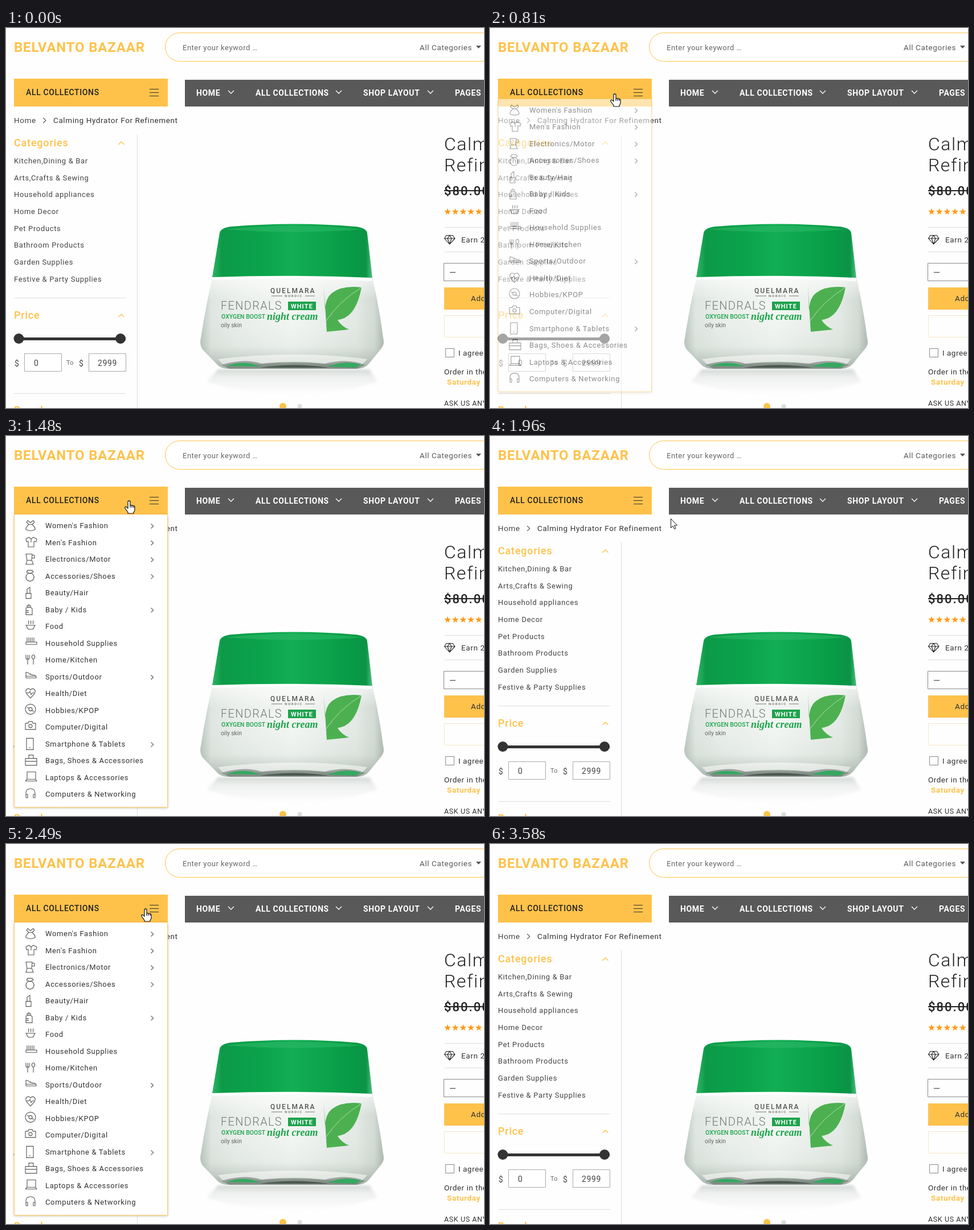
These frames come from a looping animation (839x668 px, 3780 ms). An HTML page:

```html
<!DOCTYPE html>
<html lang="en">
<head>
<meta charset="utf-8">
<title>Shop menu</title>
<style>
  html, body { margin: 0; width: 100%; height: 100%; overflow: hidden; background: #fefefe; }
  svg { display: block; width: 839px; height: 668px; }
  text { font-family: Roboto, "Noto Sans", sans-serif; font-size: 13px; letter-spacing: .65px; fill: #444; white-space: pre; }
  .line { fill: none; stroke: #ddd; }
  .icon { fill: none; stroke: #555; stroke-width: 1.1; stroke-linejoin: round; }
  .panel { filter: drop-shadow(0 1px 2px rgba(150, 110, 30, .4)); }
  .btn { filter: drop-shadow(0 1px 1.5px rgba(0, 0, 0, .3)); }
</style>
</head>
<body>
<svg id="stage" viewBox="0 0 839 668">
  <defs>
    <linearGradient id="lid">
      <stop offset="0" stop-color="#2fb765"/><stop offset=".06" stop-color="#0c9a48"/>
      <stop offset=".3" stop-color="#0aa34b"/><stop offset=".5" stop-color="#12ae54"/>
      <stop offset=".85" stop-color="#079c46"/><stop offset=".96" stop-color="#0b9346"/>
      <stop offset="1" stop-color="#4dc07c"/>
    </linearGradient>
    <linearGradient id="glass">
      <stop offset="0" stop-color="#b9c4bd"/><stop offset=".06" stop-color="#dfe6e1"/>
      <stop offset=".2" stop-color="#e9eeea"/><stop offset=".5" stop-color="#f3f6f3"/>
      <stop offset=".85" stop-color="#e3e9e4"/><stop offset=".95" stop-color="#d2dad4"/>
      <stop offset="1" stop-color="#adb8b0"/>
    </linearGradient>
    <linearGradient id="shade" x2="0" y2="1">
      <stop offset="0" stop-color="#fff" stop-opacity=".6"/><stop offset=".25" stop-color="#fff" stop-opacity="0"/>
      <stop offset=".75" stop-color="#9fb0a4" stop-opacity=".1"/><stop offset="1" stop-color="#76887b" stop-opacity=".55"/>
    </linearGradient>
    <linearGradient id="mirror" x2="0" y2="1">
      <stop offset="0" stop-color="#d3d8d5"/><stop offset=".3" stop-color="#eef0ef"/>
      <stop offset="1" stop-color="#fefefe"/>
    </linearGradient>
    <filter id="soft"><feGaussianBlur stdDeviation="2"/></filter>
  </defs>

  <g id="jar">
    <path d="M372 600H638L652 622Q505 668 352 622Z" fill="url(#mirror)" filter="url(#soft)"/>
    <g id="body">
      <path id="glassShape" d="M363 438Q352 480 342 545Q339 556 345 565L369 590Q376 599 392 599H614Q630 599 637 590L659 563Q665 555 662 545Q655 490 643 438Z" fill="url(#glass)"/>
      <path d="M363 438Q352 480 342 545Q339 556 345 565L369 590Q376 599 392 599H614Q630 599 637 590L659 563Q665 555 662 545Q655 490 643 438Z" fill="url(#shade)"/>
      <path d="M372 582Q505 566 634 582L622 595Q505 584 384 595Z" fill="#fff" opacity=".55"/>
      <path d="M378 592Q420 580 448 590Q505 584 560 590Q600 580 630 592L616 599H392Z" fill="#5d6a61" opacity=".55"/>
      <path d="M386 594Q420 583 446 595ZM564 595Q596 583 624 592L612 597Z" fill="#35a860"/>
      <path d="M446 597Q505 588 566 597Z" fill="#3f4a43" opacity=".8"/>
    </g>
    <path d="M362 438Q505 430 643 440L642 445Q505 437 362 443Z" fill="#fff" opacity=".85"/>
    <path d="M375 360Q377 351 396 349Q505 340 612 349Q632 351 634 360L643 439Q505 433 362 438Z" fill="url(#lid)"/>
    <path d="M384 354Q505 341 626 354Q505 363 384 354Z" fill="#2fbb69" opacity=".55"/>
    <path d="M558 453L563 534L602 530Q588 524 582 513Q614 510 624 456Q590 452 572 466Q560 476 560 498Z" fill="#4cb050"/>
    <path d="M561 516Q585 480 624 456" fill="none" stroke="#b5dcb2"/>
    <path d="M466 471H485M525 471H542" stroke="#777"/>
    <rect x="495" y="481" width="49" height="15" fill="#1da34c"/>
  </g>

  <g id="page">
    <rect x="279.5" y="8.5" width="600" height="50" rx="25" fill="#fff" stroke="#fcc24d"/>
    <path d="M825 31H834L829.5 36Z" fill="#555"/>
    <path d="M314 91H839V138H314Z" fill="#595959"/>
    <path class="line" d="M14 474.5H211M14 642.5H211M230.5 187V668M769 350.5H839M769 393.5H839"/>
    <path d="M22 546.5H210" stroke="#333" stroke-width="5"/>
    <circle cx="22.500" cy="546" r="9" fill="#333"/><circle cx="201" cy="546" r="9" fill="#333"/>
    <path d="M32.500 572.500h65v31h-65zM145.500 572.500h65v31h-65z" fill="#fff" stroke="#aaa"/>
    <path d="M769 286H839" stroke="#222" stroke-width="2"/>
    <path class="icon" style="stroke:#222" d="M773 364.500H784L788 370L778.500 380L769.500 370ZM769.500 370H788M775 370L778.500 380L782 370L778.500 364.500Z"/>
    <path d="M768.500 413.500H850V444.500H768.500ZM771.500 563.500h15v15h-15z" fill="none" stroke="#888"/>
    <path d="M779 429.500H789" stroke="#333"/>
    <path d="M769 456H839V495H769Z" fill="#fec24b"/>
    <path d="M850 505.500H769.500V543.500H850" fill="none" stroke="#f3e6c8"/>
    <circle cx="486" cy="665" r="6" fill="#fec24b"/><circle cx="515.500" cy="665" r="4" fill="#ddd"/>
  </g>

  <g id="slides"></g>
  <path d="M14 89H284V138H14Z" fill="#fec24b"/>
  <g id="bar"><path d="M252 107.500H268M252 113.500H268M252 119.500H268" stroke="#333" stroke-width="1.2"/></g>
  <g id="menu"><path class="panel" d="M14.500 138V652.500H283.500V138" fill="#fff" stroke="#fdcb69"/></g>

  <g id="cursor" stroke="#111" stroke-linejoin="round">
    <path id="hand" fill="#fff" stroke-width="1.2" d="M-2 1Q0-1 2 1V8Q4 7 5 8.500Q7 7.500 8 9Q10 8.500 10 11V15Q10 18 8 20V22H-2V20Q-5 16-7 13Q-8 10-5 10.500L-2 13ZM2 8V12M5 8.500V12M8 9V12"/>
    <path id="arrow" fill="#fff" d="M.5 .5V16.500L4 13L6.500 18.500L9 17.500L6.500 12H11.500Z"/>
    <g id="zoom" fill="#fff"><path d="M3 3L8.500 8.500" stroke-width="3"/><circle cx="-1" cy="-1" r="5.500" stroke-width="1.500"/><path d="M-4-1H2M-1-4V2" stroke-width="1.500"/></g>
  </g>
</svg>
<script>
const $ = id => document.getElementById(id);
const GOLD = '#fec24b', GREEN = '#1da34c';

function add(parent, tag, attrs) {
  const el = document.createElementNS('http://www.w3.org/2000/svg', tag);
  for (const k in attrs) el.setAttribute(k, attrs[k]);
  return $(parent).appendChild(el);
}
function label(parent, x, y, str, style = '') {
  add(parent, 'text', { x, y, style }).textContent = str;
}
function font(size, spacing, fill, weight = 400) {
  return `font-size:${size}px;letter-spacing:${spacing}px;fill:${fill};font-weight:${weight}`;
}
// Chevron centred on x, y, turned by an angle; 0 points right.
function chevron(parent, x, y, turn, stroke, size = 4.5) {
  add(parent, 'path', {
    d: `M${-size / 2} ${-size}L${size / 2} 0L${-size / 2} ${size}`, fill: 'none', stroke,
    'stroke-width': 1.3, transform: `translate(${x} ${y}) rotate(${turn})`
  });
}

// Jar label
label('jar', 464, 466, 'QUELMARA', font(12, 2, '#555', 500));
label('jar', 489, 473, 'NORDIC', font(6, 1.7, '#666', 500));
label('jar', 377, 495, 'FENDRALS', font(20, 1.3, '#777', 300));
label('jar', 500, 493, 'WHITE', font(11, 1.1, '#fff', 700));
label('jar', 378, 511, 'OXYGEN BOOST', font(10.5, 0, GREEN, 500));
label('jar', 458, 513, 'night cream', font(18, 0, GREEN, 700) + ';font-style:italic;font-family:"Liberation Serif",serif');
label('jar', 377, 526, 'oily skin', font(10.3, 0, '#666'));

// Header
label('page', 14, 42, 'BELVANTO BAZAAR', font(24, .8, GOLD, 700));
label('page', 310, 38.5, 'Enter your keyword …', font(13, .5, '#666'));
label('page', 726, 38.5, 'All Categories', font(13.5, .6, '#5a5a5a'));
[[334, 'HOME'], [438, 'ALL COLLECTIONS'], [627, 'SHOP LAYOUT'], [788, 'PAGES']]
  .forEach(([x, s]) => label('page', x, 119, s, font(14, .6, '#fff', 700)));
[395, 584, 745].forEach(x => chevron('page', x, 112.500, 90, '#fff', 5));
label('bar', 35, 118, 'ALL COLLECTIONS', font(14, .63, '#222', 500));

// Breadcrumb and sidebar
label('page', 14, 167, 'Home', font(13.5, .6, '#444'));
chevron('page', 67.500, 162.500, 0, '#666');
label('page', 83, 167, 'Calming Hydrator For Refinement', font(13.5, .6, '#333'));
[[208, 'Categories'], [511, 'Price'], [678, 'Brand']].forEach(([y, s]) => {
  label('page', 14, y, s, font(18, .8, GOLD, 500));
  chevron('page', 202.500, y - 5.500, -90, GOLD, 5);
});
['Kitchen,Dining & Bar', 'Arts,Crafts & Sewing', 'Household appliances', 'Home Decor', 'Pet Products',
  'Bathroom Products', 'Garden Supplies', 'Festive & Party Supplies']
  .forEach((s, i) => label('page', 14, 238 + 29.65 * i, s));
[[15, '$'], [49, '0'], [128, '$'], [161, '2999']]
  .forEach(([x, s]) => label('page', x, 593.500, s, font(14, .65, '#444')));
label('page', 106, 592, 'To', font(11, .3, '#666'));

// Product details
label('page', 769, 215, 'Calming', font(32, 1.5, '#222', 300));
label('page', 769, 252, 'Refinement', font(32, 1.5, '#222', 300));
label('page', 769, 294, '$80.00', font(22, 2, '#222', 500));
for (let i = 0; i < 5; i++) {
  let d = '';
  for (let k = 0; k < 10; k++) {
    const r = k % 2 ? 2.6 : 6.2, a = k * Math.PI / 5;
    d += (k ? 'L' : 'M') + (775 + 13.7 * i + r * Math.sin(a)).toFixed(1) + ' ' + (323 - r * Math.cos(a)).toFixed(1);
  }
  add('page', 'path', { d: d + 'Z', fill: '#ff9a17' });
}
label('page', 799, 377, 'Earn 200 points', font(13.5, .6, '#333'));
label('page', 816, 480, 'Add to cart', font(13.5, .6, '#333'));
label('page', 794, 576, 'I agree with', font(13.5, .5, '#333'));
label('page', 769, 609, 'Order in the next', font(13.5, .5, '#333'));
label('page', 774, 627, 'Saturday', font(13.5, .6, GOLD, 700));
label('page', 769, 664, 'ASK US ANYTHING', font(12.5, .6, '#333'));

// Slider buttons
[[250.5, 180], [721.5, 0]].forEach(([x, turn]) => {
  add('slides', 'rect', { x, y: 422.500, width: 30, height: 30, fill: '#fff', class: 'btn' });
  chevron('slides', x + 15, 437.500, turn, '#e5b65a');
});

// Menu rows: text, icon path, submenu
[
  ["Women's Fashion", 'M4 1L9 5L14 1L16 4L12 8H6L2 4ZM6 8Q0 14 1 17Q9 21 17 17Q18 14 12 8', 1],
  ["Men's Fashion", 'M6 1L1 4L2 9L5 8V18H15V8L19 9L20 4L14 1L10 4ZM10 4V10', 1],
  ['Electronics/Motor', 'M1 1H12L11 12H3ZM12 3H16V8H12M3 12L1 19H14L11 12', 1],
  ['Accessories/Shoes', 'M8 5a7 7 0 1 0 .1 0M4 0H12L14 3L8 6L2 3Z', 1],
  ['Beauty/Hair', 'M1 20V11H10V20ZM3 11V4L8 0V11', 0],
  ['Baby / Kids', 'M1 19V9Q1 6 6 6Q12 6 12 9V19ZM3 6V3H9V6M6 3V0M1 12H6M1 15H6', 1],
  ['Food', 'M0 8H18M2 8Q3 15 6 15H12Q15 15 16 8M5 0q2 3 0 6M9 0q2 3 0 6M13 0q2 3 0 6', 0],
  ['Household Supplies', 'M1 12H20V8H1ZM3 8V0M6 8V0M9 8V0M12 8V0M15 8V0', 0],
  ['Home/Kitchen', 'M1 1V6Q1 9 4 9Q7 9 7 6V1M4 1V18M14 9Q10 6 12 2Q14 0 16 2Q18 6 14 9V18', 0],
  ['Sports/Outdoor', 'M1 2L5 3Q9 7 15 7Q20 8 19 12H1ZM1 9H19M8 6l2-2', 1],
  ['Health/Diet', 'M9 18L2 10Q-1 5 3 2Q7 0 9 4Q11 0 15 2Q19 5 16 10ZM2 9H6L8 6L10 12L12 9H16', 0],
  ['Hobbies/KPOP', 'M0 8a9 9 0 1 0 18 0a9 9 0 1 0-18 0M6 8a3 3 0 1 0 6 0a3 3 0 1 0-6 0M3 5L7 6M11 10L15 12', 0],
  ['Computer/Digital', 'M0 3H5L6 0H12L13 3H18V14H0ZM6 8a3 3 0 1 0 6 0a3 3 0 1 0-6 0', 0],
  ['Smartphone & Tablets', 'M2 0H14V20H2ZM7 16.500h2', 1],
  ['Bags, Shoes & Accessories', 'M0 6H20V18H0ZM6 6V0H14V6M0 11H20', 0],
  ['Laptops & Accessories', 'M3 0H18V13H3ZM3 13L0 16H20L18 13', 0],
  ['Computers & Networking', 'M1 16V8Q1 0 9 0Q17 0 17 8V16M1 10H4V16H1M17 10H14V16H17', 0]
].forEach(([name, d, sub], i) => {
  const y = 162 + 29.53 * i;
  label('menu', 69, y, name, 'fill:#333');
  add('menu', 'path', { d, class: 'icon', transform: `translate(34 ${y - 14.500})` });
  if (sub) chevron('menu', 256.500, y - 3.500, 0, '#666', 4);
});

// Pointer steps: time, x, y
const steps = [
  [0, -99, -99], [270, 815, 640], [340, 790, 600], [400, 740, 540], [470, 660, 460], [540, 560, 370],
  [610, 440, 270], [670, 330, 180], [740, 246, 118], [810, 219, 116], [880, 217, 116], [950, 216, 116],
  [1480, 216, 114], [1680, 236, 120], [1750, 276, 132], [1820, 296, 140], [1890, 308, 143], [1960, 317, 145],
  [2030, 330, 148], [2160, 334, 148], [2220, 318, 140], [2290, 282, 128], [2350, 262, 120], [2420, 250, 115],
  [2490, 245, 114], [2560, 243, 116], [2690, 242, 118], [2820, 290, 150], [2890, 400, 230], [2960, 520, 325],
  [3030, 625, 415], [3100, 695, 477], [3170, 730, 490], [3240, 755, 480], [3310, 762, 455], [3380, 770, 390],
  [3450, 790, 270], [3510, 815, 110], [3580, -99, -99]
];
const LOOP = 3780, FADE = 210;
const opened = [[740, 1740], [2270, 2810]];

const ease = x => 1 - (1 - Math.min(1, Math.max(0, x))) ** 2;
const show = (id, on) => $(id).style.display = on ? '' : 'none';

function draw(now) {
  const time = now % LOOP;
  const [t, x, y] = steps.findLast(s => s[0] <= time);
  const open = Math.max(...opened.map(([on, off]) => ease((t - on) / FADE) - ease((t - off) / FADE)));
  $('menu').setAttribute('opacity', open);
  $('menu').setAttribute('transform', `translate(0 ${-30 * (1 - open)})`);

  const overBar = x > 13 && x < 284 && y > 88 && y < 138;
  const overSlides = x > 240 && x < 758 && y > 187;
  show('hand', overBar);
  show('zoom', overSlides);
  show('arrow', !overBar && !overSlides);
  show('slides', overSlides);
  $('cursor').setAttribute('transform', `translate(${x} ${y})`);
}

const start = performance.now();
function tick() {
  draw(performance.now() - start);
  requestAnimationFrame(tick);
}
tick();
</script>
</body>
</html>
```
